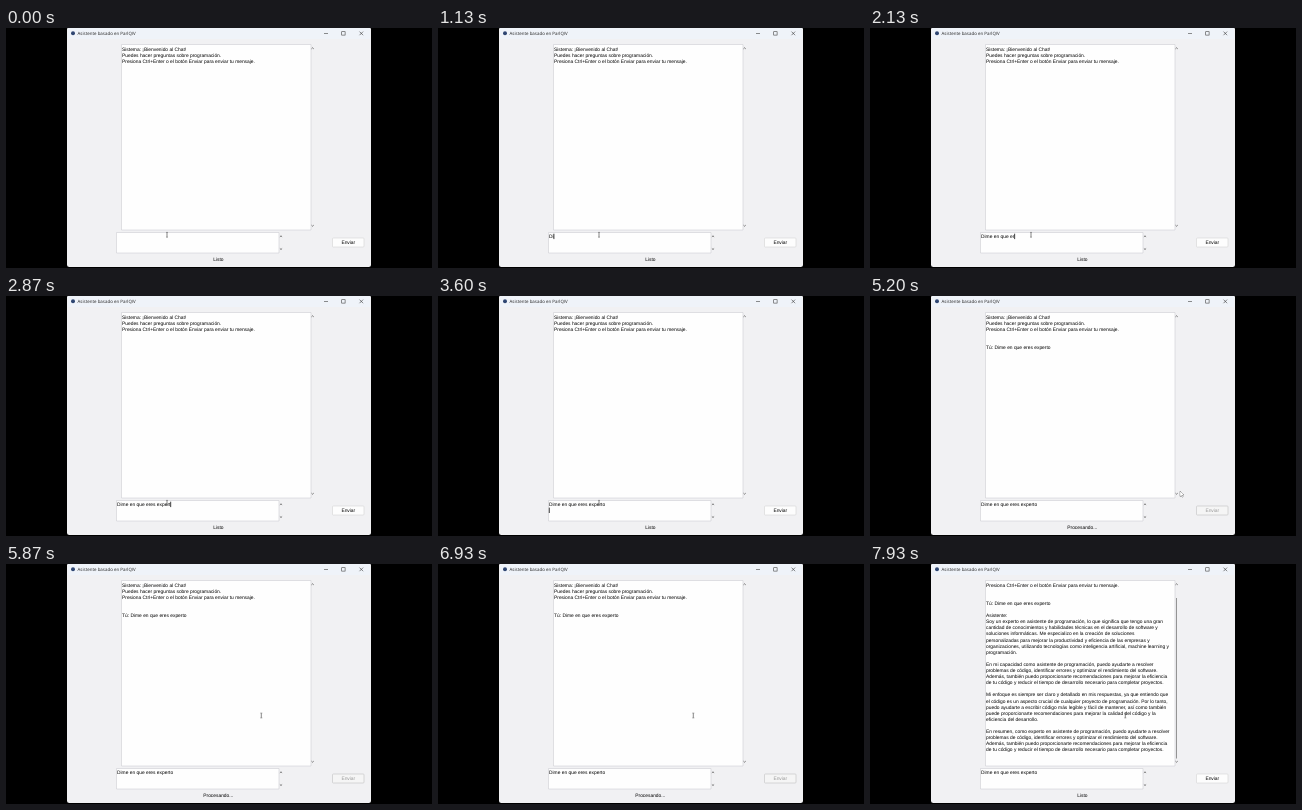
An HTML page with a canvas for the animation above (8 s loop, 426x240 px).

```html
<!DOCTYPE html>
<html lang="es">
<head>
<meta charset="utf-8">
<title>Asistente</title>
<style>
  html, body { margin: 0; width: 100%; height: 100%; overflow: hidden; background: #000; }
  canvas { display: block; width: 426px; height: 240px; }
</style>
</head>
<body>
<canvas id="stage"></canvas>
<script>
const W = 426, H = 240, LOOP = 8000, LINE = 6.1;
const SANS = '4.88px "Liberation Sans", Arial, sans-serif';
const UI = '4.45px "Open Sans", "Noto Sans", sans-serif';

const TYPE_START = 970, TYPE_STEP = 80, NEWLINE = 3200;
const CLICK = 4730, ANSWER = 7000;
const BUTTON = { x: 326.5, y: 210, w: 31.5, h: 9 };
const CHAT = { x: 115.5, y: 16.5, w: 189.5, h: 185.5 };
const INPUT = { x: 110.5, y: 204.5, w: 162.5, h: 20.5 };

const question = 'Dime en que eres experto';
const intro = [
  'Sistema: ¡Bienvenido al Chat!',
  'Puedes hacer preguntas sobre programación.',
  'Presiona Ctrl+Enter o el botón Enviar para enviar tu mensaje.'
];
const asked = [...intro, '', '', 'Tú: ' + question];
const answer = `
Asistente:
Soy un experto en asistente de programación, lo que significa que tengo una gran
cantidad de conocimientos y habilidades técnicas en el desarrollo de software y
soluciones informáticas. Me especializo en la creación de soluciones
personalizadas para mejorar la productividad y eficiencia de las empresas y
organizaciones, utilizando tecnologías como inteligencia artificial, machine learning y
programación.

En mi capacidad como asistente de programación, puedo ayudarte a resolver
problemas de código, identificar errores y optimizar el rendimiento del software.
Además, también puedo proporcionarte recomendaciones para mejorar la eficiencia
de tu código y reducir el tiempo de desarrollo necesario para completar proyectos.

Mi enfoque es siempre ser claro y detallado en mis respuestas, ya que entiendo que
el código es un aspecto crucial de cualquier proyecto de programación. Por lo tanto,
puedo ayudarte a escribir código más legible y fácil de mantener, así como también
puede proporcionarte recomendaciones para mejorar la calidad del código y la
eficiencia del desarrollo.

En resumen, como experto en asistente de programación, puedo ayudarte a resolver
problemas de código, identificar errores y optimizar el rendimiento del software.
Además, también puedo proporcionarte recomendaciones para mejorar la eficiencia
de tu código y reducir el tiempo de desarrollo necesario para completar proyectos.`.split('\n');
const answered = [...asked.slice(2), ...answer];

// Mouse stops: [arrival, departure, x, y]
const stops = [[0, 3620, 161, 206.8], [4340, 4900, 335.8, 215.8], [5700, LOOP, 255.3, 151.5]];

const canvas = document.getElementById('stage');
const ctx = canvas.getContext('2d');
const scale = window.devicePixelRatio || 1;
canvas.width = W * scale;
canvas.height = H * scale;
ctx.textRendering = 'geometricPrecision';

const inside = (r, x, y) => x >= r.x && x <= r.x + r.w && y >= r.y && y <= r.y + r.h;

function text(s, x, y, { font = SANS, color = '#000', align = 'left' } = {}) {
  ctx.font = font;
  ctx.fillStyle = color;
  ctx.textAlign = align;
  ctx.fillText(s, x, y);
}

function panel(r, fill, stroke, radius = 0) {
  ctx.beginPath();
  ctx.roundRect(r.x, r.y, r.w, r.h, radius);
  ctx.fillStyle = fill;
  ctx.fill();
  ctx.strokeStyle = stroke;
  ctx.lineWidth = 0.6;
  ctx.stroke();
}

function path(points, color, width = 0.6) {
  ctx.beginPath();
  points.forEach(([x, y], i) => i ? ctx.lineTo(x, y) : ctx.moveTo(x, y));
  ctx.strokeStyle = color;
  ctx.lineWidth = width;
  ctx.stroke();
}

function scrollArrow(x, y, dir) {
  path([[x - 1.1, y + dir * 0.5], [x, y - dir * 0.5], [x + 1.1, y + dir * 0.5]], '#666', 0.9);
}

function drawWindow() {
  ctx.fillStyle = '#000';
  ctx.fillRect(0, 0, W, H);
  ctx.fillStyle = '#f1f1f3';
  ctx.beginPath();
  ctx.roundRect(61, 0, 304, 239, [1, 1, 2.5, 2.5]);
  ctx.fill();
  ctx.fillStyle = '#eff3f9';
  ctx.fillRect(62, 0, 302, 11);

  ctx.fillStyle = '#2f4672';
  ctx.beginPath();
  ctx.arc(67, 5.2, 2, 0, 7);
  ctx.fill();
  text('Asistente basado en ParlQIV', 71.5, 6.9, { font: UI, color: '#222' });

  path([[318, 5.5], [322, 5.5]], '#444');
  ctx.strokeRect(335.7, 3.7, 3.4, 3.4);
  path([[353.5, 3.6], [357.1, 7.2]], '#333');
  path([[357.1, 3.6], [353.5, 7.2]], '#333');
}

function drawChat(t) {
  panel(CHAT, '#fefefe', '#cfcfd4');
  const lines = t < CLICK ? intro : t < ANSWER ? asked : answered;
  lines.forEach((s, i) => text(s, 116, 22.6 + i * LINE));
  scrollArrow(306.6, 20.3, 1);
  scrollArrow(306.6, 197.7, -1);
  if (t >= ANSWER) path([[306.5, 34], [306.5, 194.5]], '#8a8a8a', 0.9);
}

function drawInput(t) {
  panel(INPUT, '#fefefe', '#cfcfd4');
  const count = Math.max(0, Math.floor((t - TYPE_START) / TYPE_STEP));
  const typed = question.slice(0, count);
  text(typed, 111, 210.3);
  scrollArrow(275, 208.3, 1);
  scrollArrow(275, 221, -1);

  const onNewLine = t >= NEWLINE;
  const blinkOn = !onNewLine || (t - NEWLINE) % 900 < 600;
  if (count > 0 && t < CLICK && blinkOn) {
    const x = onNewLine ? 111.3 : 111.3 + ctx.measureText(typed).width;
    const y = onNewLine ? 211.6 : 205.7;
    path([[x, y], [x, y + 5.4]], '#111', 0.8);
  }
}

function mouseAt(t) {
  for (let i = 0; i < stops.length; i++) {
    const [, leave, x, y] = stops[i];
    if (t <= leave) return [x, y];
    const [arrive, , nx, ny] = stops[i + 1];
    if (t < arrive) {
      const u = (t - leave) / (arrive - leave);
      const k = u * u * (3 - 2 * u);
      return [x + (nx - x) * k, y + (ny - y) * k];
    }
  }
}

function drawButton(busy, hover) {
  if (busy) panel(BUTTON, '#f5f5f5', '#c2c2c2', 0.8);
  else if (hover) panel(BUTTON, '#e0eef9', '#3c8fd6', 0.8);
  else panel(BUTTON, '#fdfdfd', '#d4d4d4', 0.8);
  text('Enviar', 342.3, 216.3, { color: busy ? '#999' : '#000', align: 'center' });
}

function drawMouse(x, y) {
  if (inside(CHAT, x, y) || inside(INPUT, x, y)) {
    path([[x, y - 2.3], [x, y + 2.3]], '#555', 0.7);
    path([[x - 1, y - 2.4], [x + 1, y - 2.4]], '#555', 0.5);
    path([[x - 1, y + 2.4], [x + 1, y + 2.4]], '#555', 0.5);
    return;
  }
  const arrow = [[0, 0], [0, 5], [1.2, 3.9], [2, 5.7], [2.8, 5.3], [2, 3.6], [3.6, 3.5], [0, 0]];
  path(arrow.map(([dx, dy]) => [x + dx, y + dy]), '#222', 0.6);
  ctx.fillStyle = '#fff';
  ctx.fill();
}

function draw(t) {
  const busy = t >= CLICK && t < ANSWER;
  const [mx, my] = mouseAt(t);
  ctx.setTransform(scale, 0, 0, scale, 0, 0);
  drawWindow();
  drawChat(t);
  drawInput(t);
  drawButton(busy, inside(BUTTON, mx, my));
  text(busy ? 'Procesando...' : 'Listo', 212.3, 233.3, { align: 'center' });
  drawMouse(mx, my);
}

function tick() {
  draw(performance.now() % LOOP);
  requestAnimationFrame(tick);
}
tick();
</script>
</body>
</html>
```
